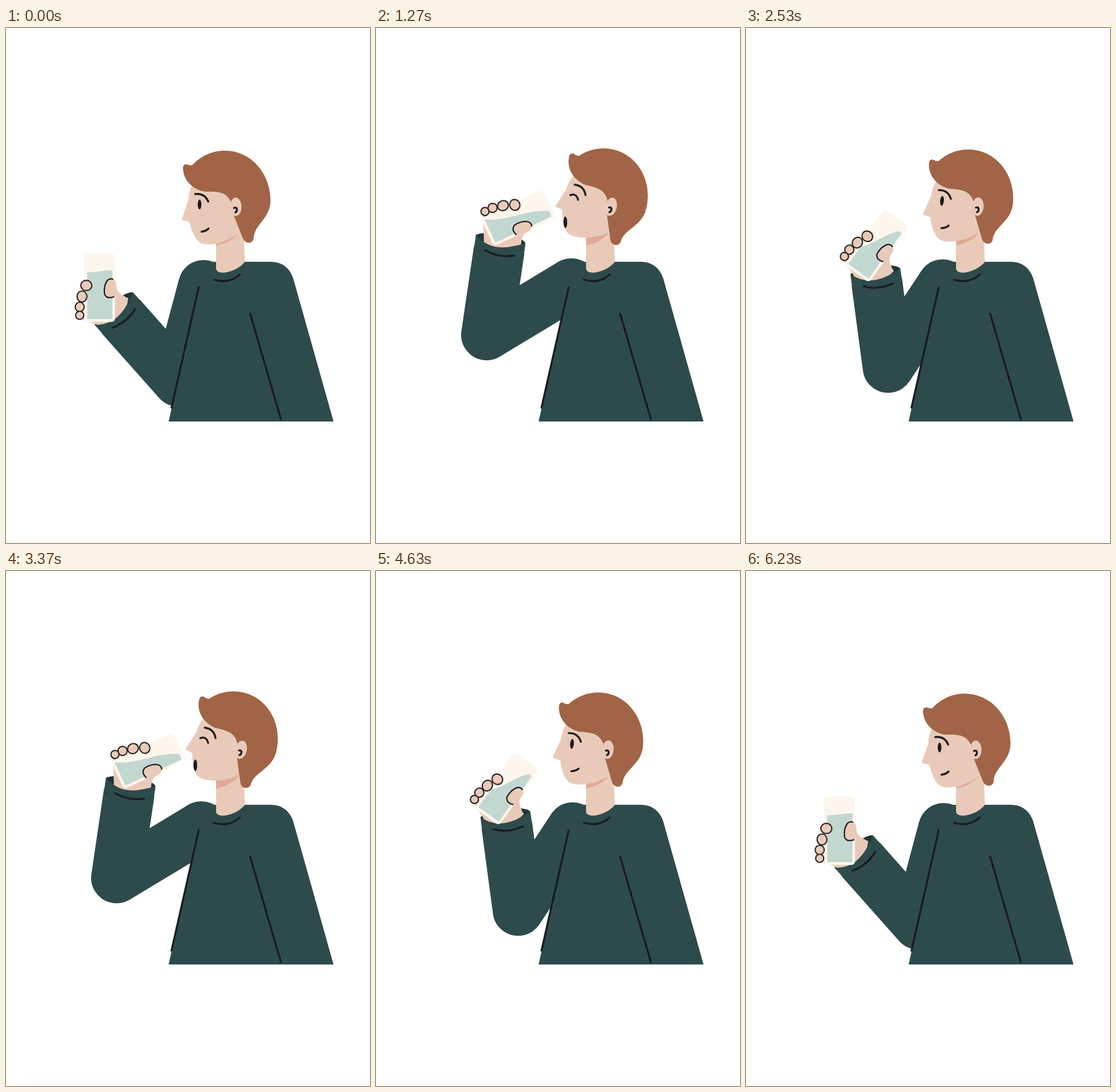
Animation, 629 px wide and 890 px high, one loop 6.31 s. Source, as an HTML page:

```html
<!DOCTYPE html>
<html lang="en">
<head>
<meta charset="utf-8">
<title>Drinking</title>
<style>
  html, body { margin: 0; height: 100%; overflow: hidden; background: #fff; }
  svg { display: block; }
  .skin { fill: #e9cab8; }
  .cloth { fill: #2e4b4c; }
  .ink { fill: #1b1b1f; }
  .line { fill: none; stroke: #1b1b1f; stroke-width: 3.4; stroke-linecap: round; stroke-linejoin: round; }
  .finger { fill: #e9cab8; stroke: #2a2626; stroke-width: 2.2; }
</style>
</head>
<body>
<svg width="629" height="890" viewBox="0 0 629 890">
  <circle id="shoulder" class="cloth" r="44"/>
  <polyline id="arm" fill="none" stroke="#2e4b4c" stroke-width="88" stroke-linejoin="round"/>

  <path class="cloth" d="M281 680L337 430Q345 404 362 404H457C480 404 492 418 497 435L566 680Z"/>
  <path class="line" d="M333 448L286 656M422 494L475 676M359.500 435Q385 443 404 426"/>

  <path class="skin" d="M363 345H410L413 404C396 424 364 428 363 416Z"/>
  <path fill="#e4a896" d="M363 350V376Q385 372 400 357V345Z"/>

  <g id="head">
    <path class="skin" d="M322 270Q315 284 315 298L304 330Q304 333 309 333L317 335Q320 350 327 362Q334 374 347 374Q375 374 400 356L408 310L390 270Z"/>
    <path fill="#a16447" d="M306 245Q305 235 312 235.500Q317 238 322 237C336 222 355 212 378 212C424 212 457 252 457 298C457 330 428 340 428 364Q426 372 418 371Q411 370 408 360L394 325L388 299C380 284 368 282 345 283C325 280 308 266 306 245Z"/>
    <ellipse class="skin" cx="397" cy="309" rx="10" ry="16"/>
    <path class="line" d="M394 311Q398 309 399 313Q399 318 396.500 318.500M327 287Q343 285 349.500 300"/>
    <g id="calm">
      <ellipse class="ink" cx="334.500" cy="305" rx="3.200" ry="8.500"/>
      <path class="line" d="M338 352Q346 351 350 346.500"/>
    </g>
    <g id="sipping">
      <path class="line" d="M324 306.500Q333 300 339 311"/>
      <ellipse class="ink" cx="327" cy="354" rx="3.200" ry="10" transform="rotate(-14 327 354)"/>
    </g>
  </g>

  <path id="cuffBack" fill="#20343a" d="M219 456C205 452 160 490 153 512L170 531L236 475Z"/>
  <path id="palm" class="skin" d="M183 434Q190 432 190 443Q188 456 211 466L205 500L175 520L155 511L133 503L136 470Z"/>
  <g id="cuffFront">
    <path class="cloth" d="M219 456C205 488 190 512 153 512L170 531L236 475Z"/>
    <path class="line" d="M183.500 517Q209 508 223 484.500"/>
  </g>
  <g id="hand">
    <rect x="135" y="389" width="53" height="118" rx="6" fill="#fdf6ec"/>
    <path id="water" fill="#c3d7d1"/>
    <path class="skin" d="M186 463.500Q174 468 170 459Q168 444 175 435Q188 428 190 443L192 457Z"/>
    <path class="line" style="stroke-width:2.200" d="M186 463.500Q174 468 170 459Q168 444 175 435Q180 431 184 433"/>
    <ellipse class="finger" cx="138.500" cy="444" rx="9.500" ry="8.800"/>
    <ellipse class="finger" cx="131" cy="463" rx="8.500" ry="9.500"/>
    <ellipse class="finger" cx="127" cy="481" rx="7.800" ry="8"/>
    <ellipse class="finger" cx="127" cy="495.500" rx="7" ry="7"/>
  </g>
</svg>
<script>
const $ = id => document.getElementById(id);
const RAD = Math.PI / 180, LOOP = 6310;

// [pose, upper arm, forearm, glass, head], angles in degrees from rest
const keys = [
  [0, 0, 0, 0, 0], [2, 1, 5, 3, 0], [4, 9, 24, 22, 2], [6, 28, 44, 50, 9],
  [8, 41, 52, 66, 16], [10, 46, 54, 73, 18.5], [16, 47, 55, 74, 18.5],
  [17, 47, 54, 72, 17.5], [18, 44, 50, 65, 14], [19, 35, 31, 40, 6],
  [20, 24, 13, 16, .5], [21, 20.5, 4, 5, 0], [22, 17, 0, 0, 0],
  [25, 6, 0, 0, 0], [28, 0, 0, 0, 0], [30, 0, 0, 0, 0]
];

function anglesAt(pose) {
  const i = keys.findIndex(k => k[0] > pose), a = keys[i - 1], b = keys[i];
  const f = (pose - a[0]) / (b[0] - a[0]);
  return a.slice(1).map((v, j) => v + (b[j + 1] - v) * f);
}

// 30 poses per sip; every tenth one is held a little longer
function poseAt(ms) {
  const t = ms % 2100, part = t % 700;
  const step = part < 100 ? 0 : 1 + Math.floor((part - 100) * 9 / 600 + 1e-6);
  return Math.floor(t / 700) * 10 + step;
}

function place(id, x, y, angle, px, py) {
  $(id).setAttribute('transform', `translate(${x} ${y}) rotate(${angle}) translate(${-px} ${-py})`);
}

function drawWater(k) {
  const ax = 140, ay = Math.min(502, 421 + 79 * k), bx = 183 - 9 * k, by = 418 - 24 * k;
  const dx = (bx - ax) / 3, dy = (by - ay) / 3;
  $('water').setAttribute('d', `M${ax} ${ay}C${ax + dx + 7 * k} ${ay + dy + 3 * k + 2} ` +
    `${bx - dx - 8 * k} ${by - dy - 4 * k - 2} ${bx} ${by}L183.500 ${by + k}V502H140Z`);
}

function draw(ms) {
  const [upper, fore, glass, tilt] = anglesAt(poseAt(ms));
  const lift = upper / 44, sx = 341.5 - 4 * lift, sy = 445 - 3 * lift;
  const a = (14.9 + upper) * RAD, b = (fore - 41.6) * RAD, f = fore * RAD;
  const ex = sx - 171 * Math.sin(a), ey = sy + 171 * Math.cos(a);
  const along = d => [ex + d * Math.sin(b), ey - d * Math.cos(b)];
  const [cx, cy] = along(167.5);

  $('shoulder').setAttribute('cx', sx);
  $('shoulder').setAttribute('cy', sy);
  $('arm').setAttribute('points', [sx, sy, ex, ey, ...along(149)].join(' '));
  place('cuffBack', cx, cy, fore, 186, 484);
  place('cuffFront', cx, cy, fore, 186, 484);

  const wx = cx + 24 * Math.cos(f) - 20 * Math.sin(f);
  const wy = cy + 24 * Math.sin(f) + 20 * Math.cos(f);
  place('palm', wx, wy, glass, 210, 504);
  place('hand', wx, wy, glass, 210, 504);
  drawWater(glass / 65);

  place('head', 401.5, 345.6, tilt, 401.5, 345.6);
  $('calm').style.display = tilt > 7 ? 'none' : '';
  $('sipping').style.display = tilt > 7 ? '' : 'none';
}

const start = performance.now();
function tick() {
  draw((performance.now() - start) % LOOP);
  requestAnimationFrame(tick);
}
tick();
</script>
</body>
</html>
```
